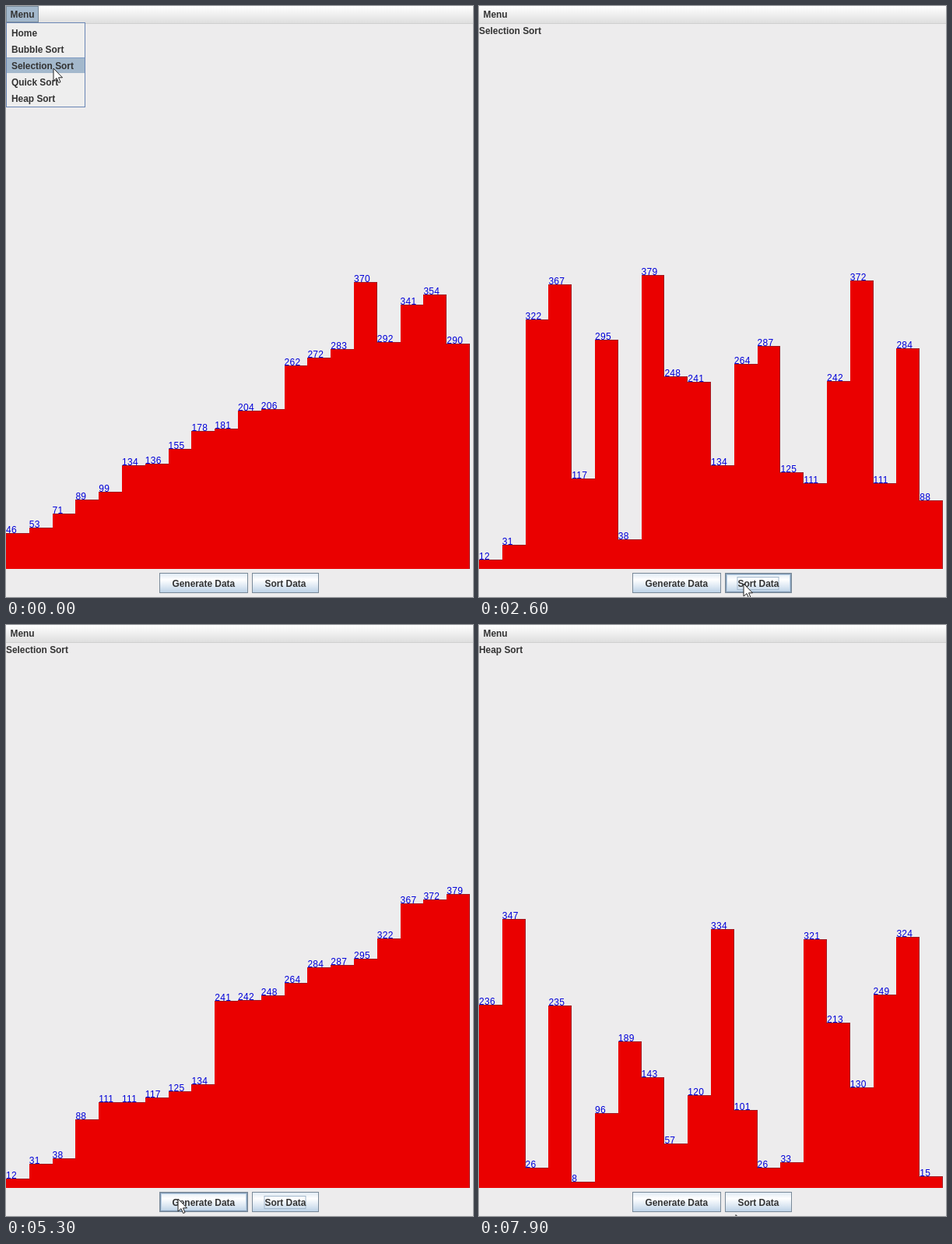
Write an HTML page with a canvas that moves like this. It is 600x758 px and loops after 8 s.

```html
<!DOCTYPE html>
<html lang="en">
<head>
<meta charset="utf-8">
<title>Sorting visualiser</title>
<style>
html, body { margin: 0; width: 100%; height: 100%; overflow: hidden; background: #edeced; }
canvas { display: block; }
</style>
</head>
<body>
<canvas id="stage" width="600" height="758"></canvas>
<script>
const ctx = document.getElementById('stage').getContext('2d');
const LOOP = 8000, STEP = 100, SWAP_MS = 110;
const CHOOSE = 300, FOCUS = 2300, SORT = 2360, OPEN = 6100, HEAP = 7300;
const SCALE = 0.995, FLOOR = 722, BAR = 29.8, ROW = 21;
const RED = '#ea0000', EDGE = '#a01820', ACTIVE = '#a3b8cc', BORDER = '#7a8a99';

// The values shown as labels on the bars
const firstData = [290, 46, 53, 71, 89, 99, 134, 136, 155, 178, 181, 204, 206, 262, 272, 283, 292, 341, 354, 370];
const selectionData = [111, 248, 322, 367, 117, 295, 38, 379, 31, 241, 134, 264, 287, 125, 12, 242, 372, 111, 284, 88];
const heapData = [236, 347, 26, 235, 8, 96, 189, 143, 57, 120, 334, 101, 26, 33, 321, 213, 130, 249, 324, 15];

const menuItems = ['Home', 'Bubble Sort', 'Selection Sort', 'Quick Sort', 'Heap Sort'];
const generate = { text: 'Generate Data', x: 197, w: 114 };
const sort = { text: 'Sort Data', x: 316, w: 86 };

// Pointer moves: each runs from start to end and stops at x, y
const moves = [
  { start: 300, end: 1100, x: 323, y: 696 },
  { start: 1100, end: 1400, x: 335, y: 757 },
  { start: 1600, end: 2200, x: 340, y: 741 },
  { start: 2600, end: 2800, x: 340, y: 760 },
  { start: 4800, end: 5200, x: 221, y: 736 },
  { start: 5300, end: 5900, x: 20, y: 8 },
  { start: 6100, end: 6900, x: 54, y: 104 },
  { start: 7000, end: 7900, x: 330, y: 756.5 }
];

const ease = k => k < 0.5 ? 4 * k ** 3 : 1 - 4 * (1 - k) ** 3;

function pointerAt(t) {
  let x = 61, y = 80;
  for (const m of moves) {
    const k = ease(Math.min(1, Math.max(0, (t - m.start) / (m.end - m.start))));
    x += (m.x - x) * k;
    y += (m.y - y) * k;
  }
  return [x, y];
}

function selectionSort(data, steps) {
  const a = data.slice();
  for (let i = 0; i < Math.min(steps, a.length - 1); i++) {
    const min = a.indexOf(Math.min(...a.slice(i)), i);
    [a[i], a[min]] = [a[min], a[i]];
  }
  return a;
}

// The first run is one swap away from done: 370 and 290 still trade places
function firstRun(t) {
  const a = firstData.slice().sort((p, q) => p - q);
  if (t >= STEP) return a;
  const low = a.indexOf(290), high = a.length - 1;
  [a[low], a[high]] = [a[high], a[low]];
  return a;
}

function valuesAt(t) {
  if (t < CHOOSE) return firstRun(t);
  if (t < HEAP) return selectionSort(selectionData, Math.floor((t - SORT) / SWAP_MS));
  return heapData;
}

function box(x, y, w, h, fill, stroke) {
  if (fill) {
    ctx.fillStyle = fill;
    ctx.fillRect(x, y, w, h);
  }
  if (stroke) {
    ctx.strokeStyle = stroke;
    ctx.strokeRect(x + 0.5, y + 0.5, w - 1, h - 1);
  }
}

function gradient(y, h, ...colors) {
  const g = ctx.createLinearGradient(0, y, 0, y + h);
  colors.forEach((color, i) => g.addColorStop(i / (colors.length - 1), color));
  return g;
}

function label(text, x, y) {
  ctx.font = 'bold 11.9px "Liberation Sans", Arial, sans-serif';
  ctx.fillStyle = '#333';
  ctx.fillText(text, x, y);
}

function drawBars(values) {
  const left = i => Math.round(i * BAR);
  const heights = values.map(v => Math.round(v * SCALE));
  heights.forEach((h, i) => {
    const x = left(i), w = left(i + 1) - x;
    const joint = Math.min(h, heights[i + 1] || 0) - 1;
    box(x, FLOOR - h, w, h, EDGE);
    box(x, FLOOR - h + 1, w - 1, h - 1, RED);
    if (joint > 0) box(x + w - 1, FLOOR - joint, 1, joint, RED);
  });
  ctx.font = '12px "Liberation Sans", Arial, sans-serif';
  ctx.letterSpacing = '0.3px';
  ctx.fillStyle = '#0000d8';
  values.forEach((v, i) => ctx.fillText(v, i * BAR, FLOOR - heights[i]));
  ctx.letterSpacing = '0px';
}

function drawButton({ text, x, w }, px, py, focused) {
  const y = 727, h = 26, textX = x + 16.5;
  box(x, y, w, h, gradient(y, h, '#dde8f3', '#fff', '#dde8f3', '#b8cfe5'), BORDER);
  if (px > x && px < x + w && py > y && py < y + h) {
    box(x + 1, y + 1, w - 2, h - 2, null, '#7f95ad');
    box(x + 2, y + 2, w - 4, h - 4, null, '#b8cfe5');
  }
  if (focused) box(textX - 1, y + 5, w - 32, 17, null, ACTIVE);
  label(text, textX, 745);
}

function drawMenu(py) {
  box(0, 0, 42, 21, ACTIVE, BORDER);
  box(0, 21, 102, 109, '#eee', '#6a86b5');
  const active = Math.floor((py - 24) / ROW);
  menuItems.forEach((item, i) => {
    const y = 24 + i * ROW;
    if (i === active) {
      box(1, y, 100, 20, ACTIVE);
      box(1, y, 100, 1, '#7f9cc4');
    }
    label(item, 7, y + 15);
  });
}

function drawPointer(x, y) {
  ctx.save();
  ctx.translate(x, y);
  const arrow = new Path2D('M0 0V16L4 12.5L6.7 18.5L9 17.5L6.5 11.8H11.5Z');
  ctx.fillStyle = '#fff';
  ctx.fill(arrow);
  ctx.strokeStyle = '#222';
  ctx.stroke(arrow);
  ctx.restore();
}

function draw(t) {
  const [px, py] = pointerAt(t);
  const open = t < CHOOSE || (t >= OPEN && t < HEAP);

  box(0, 0, 600, 758, '#edeced');
  box(0, 0, 600, 22, gradient(0, 22, '#fff', '#dedede'));
  box(0, 22, 600, 1, '#d0d0d0');
  drawBars(valuesAt(t));
  label(t < HEAP ? 'Selection Sort' : 'Heap Sort', 0, 36);
  drawButton(generate, px, py, false);
  drawButton(sort, px, py, t >= FOCUS && t < OPEN);
  if (open) drawMenu(py);
  label('Menu', 5.5, 15);
  drawPointer(px, py);
}

function tick() {
  draw(Math.floor(performance.now() % LOOP / STEP) * STEP);
  requestAnimationFrame(tick);
}
tick();
</script>
</body>
</html>
```
